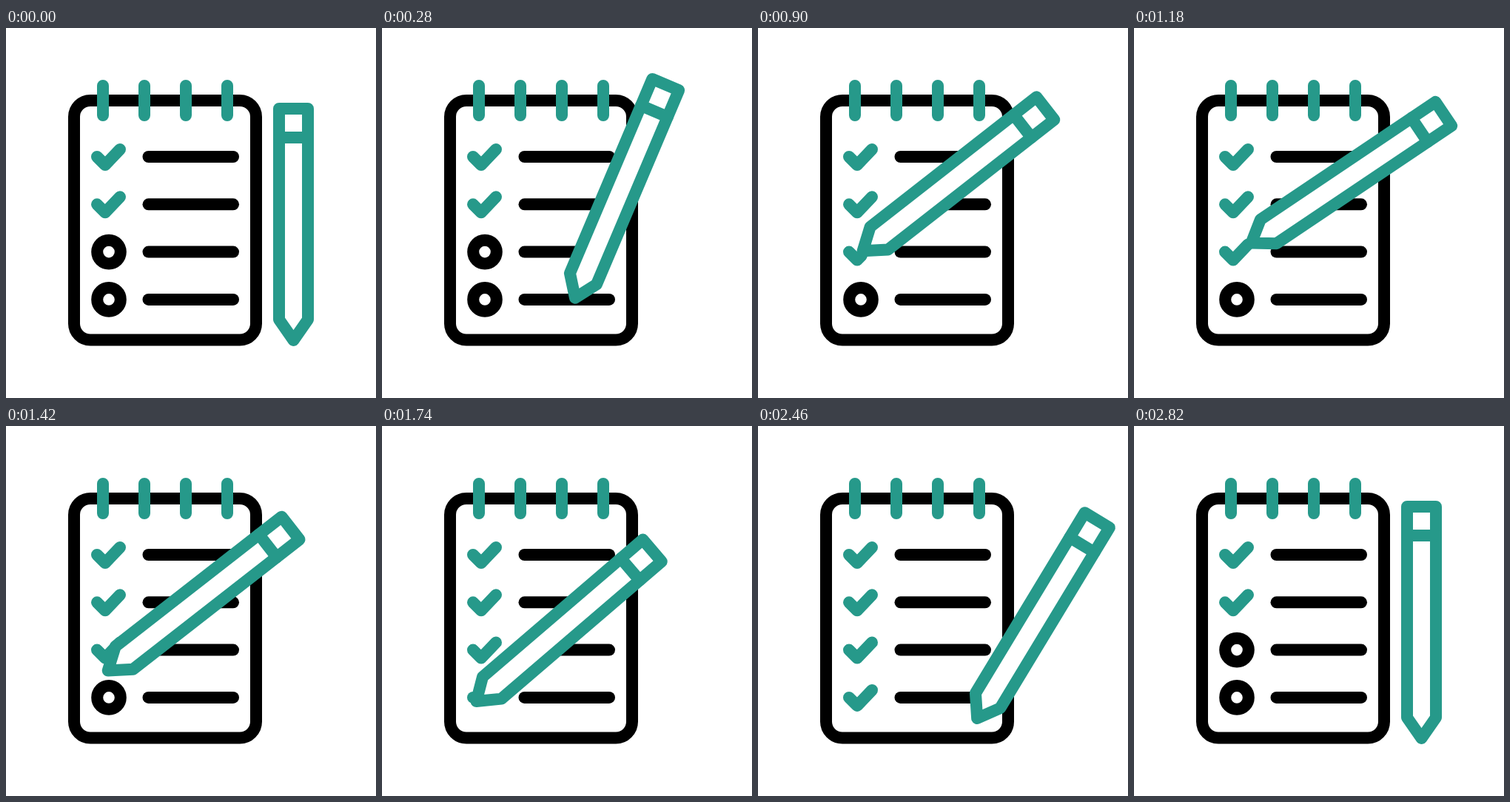
Animation of 500 by 500 pixels, one loop 3000 ms. Source, as an HTML page:

```html
<!DOCTYPE html>
<html lang="en">
<head>
<meta charset="utf-8">
<title>Checklist</title>
<style>
  html, body { margin: 0; width: 100%; height: 100%; overflow: hidden; background: #fff; }
  svg { display: block; width: 100%; height: 100%; }
  .ink, .teal { fill: none; stroke-width: 16; stroke-linecap: round; stroke-linejoin: round; }
  .ink { stroke: #000; }
  .teal { stroke: #26998a; }
  .solid { fill: #fff; }
</style>
</head>
<body>
<svg viewBox="0 0 500 500">
  <g class="ink">
    <rect x="92" y="98" width="246" height="323.5" rx="22"/>
  </g>
  <path class="teal" d="M131 78v40m56 -40v40m56 -40v40m56 -40v40"/>
  <g id="rows"></g>
  <!-- the pencil's origin is its tip -->
  <g id="pencil" class="teal">
    <path class="solid" d="M0 0L-19.5 -28V-313H19.5V-28Z"/>
    <path d="M-19.5 -274H19.5"/>
  </g>
</svg>
<script>
const LOOP = 3000, STEP = 20, ROW = 64.3;
const pencil = document.getElementById('pencil');
const rows = document.getElementById('rows');

const ramp = (t, a, b) => Math.min(1, Math.max(0, (t - a) / (b - a)));
const ease = u => u * u * (3 - 2 * u);
const mix = (a, b, u) => a + (b - a) * u;
const lag = u => u ** 1.3;

for (let n = 0; n < 4; n++) {
  const open = n > 1;
  rows.innerHTML += `<g transform="translate(0 ${n * ROW})">
    <path class="ink" d="M192.5 174H307"/>
    ${open ? '<circle class="ink ring" cx="139" cy="174" r="15.8"/>' : ''}
    <path class="teal ${open ? 'tick' : ''}" pathLength="100" d="M123 174L134 185L154 164"/>
  </g>`;
}
const rings = rows.querySelectorAll('.ring');
const ticks = rows.querySelectorAll('.tick');

// Poses of the pencil: tip and tilt
const home = { x: 388.5, y: 422, tilt: 0 };
const first = n => ({ x: 119.5, y: 172.6 + n * ROW, tilt: 48.5 });
const last = n => ({ x: 158.5, y: 162 + n * ROW, tilt: 56.1 });

const glide = (p, q, u, turn = u) => ({
  x: mix(p.x, q.x, u), y: mix(p.y, q.y, u), tilt: mix(p.tilt, q.tilt, turn)
});

// Down to the bend of the tick, then up along a flattening stroke
function write(n, u) {
  const a = first(n), b = last(n);
  const bend = { x: 134, y: 184.5 + n * ROW };
  const down = ramp(u, 0, 0.35), up = ramp(u, 0.35, 1);
  return {
    x: mix(mix(a.x, bend.x, down), b.x, up),
    y: mix(mix(a.y, bend.y, down), b.y, 1 - (1 - up) ** 2),
    tilt: mix(a.tilt, b.tilt, lag(u))
  };
}

function pose(t) {
  if (t < 580) return glide(home, first(2), ease(t / 580));
  if (t < 1180) return write(2, ramp(t, 580, 1160));
  if (t < 1640) return glide(last(2), first(3), ease(ramp(t, 1180, 1640)));
  if (t < 2160) return write(3, ramp(t, 1640, 2160));
  return glide(last(3), home, ease(ramp(t, 2160, 2690)), lag(ramp(t, 2160, 2720)));
}

// A ring fades out, its tick is drawn, then the ring returns
function item(i, t, gone, drawn) {
  const back = ramp(t, 2670, 2820);
  rings[i].style.opacity = Math.max(1 - gone, back);
  ticks[i].style.opacity = gone < 1 ? 0 : 1 - back;
  ticks[i].style.strokeDasharray = `${100 * ease(drawn)} 200`;
}

function draw(now) {
  const t = Math.floor((now % LOOP) / STEP) * STEP;
  const { x, y, tilt } = pose(t);
  pencil.setAttribute('transform', `translate(${x} ${y}) rotate(${tilt})`);
  item(0, t, ramp(t, 440, 540), ramp(t, 620, 1150));
  item(1, t, ramp(t, 1500, 1620), ramp(t, 1800, 2380));
}

const begin = performance.now();
function play() {
  draw(performance.now() - begin);
  requestAnimationFrame(play);
}
play();
</script>
</body>
</html>
```
